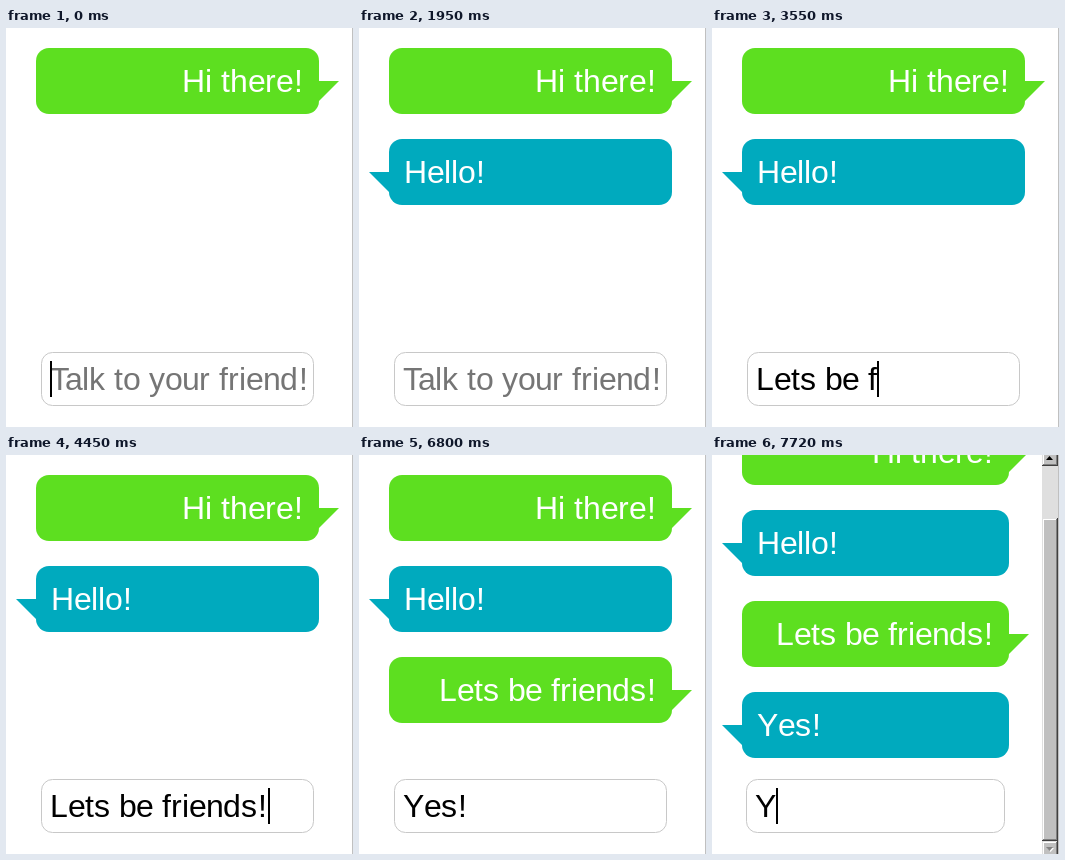
Recreate the animation shown at these times as an HTML page with a canvas. Size 347x399 px, loop 8 s.

```html
<!DOCTYPE html>
<html>
<head>
<meta charset="utf-8">
<style>
  html, body { margin: 0; width: 100%; height: 100%; overflow: hidden; background: #fff; }
  canvas { display: block; }
</style>
</head>
<body>
<canvas id="stage" width="347" height="399"></canvas>
<script>
const ctx = document.getElementById('stage').getContext('2d');
const LOOP = 8000, SCROLL_AT = 7000;
const GREEN = '#5ddf20', BLUE = '#00aabe';
const FONT = '32px "Liberation Sans", Arial, sans-serif';
const HINT = 'Talk to your friend!';

const messages = [
  { at: 0, text: 'Hi there!', mine: false },
  { at: 1650, text: 'Hello!', mine: true },
  { at: 4970, text: 'Lets be friends!', mine: false },
  { at: 7000, text: 'Yes!', mine: true }
];

// [time, typed text, caret hidden]
const typing = [
  [0, ''], [250, 'H'], [430, 'He'], [920, 'Hello'], [1370, 'Hello!'],
  [1650, ''], [1950, '', true],
  [2230, 'L'], [2400, 'Le'], [2560, 'Let'], [2720, 'Lets'], [2900, 'Lets '],
  [3060, 'Lets be'], [3230, 'Lets be '], [3400, 'Lets be f'], [3570, 'Lets be fr'],
  [3740, 'Lets be frie'], [3920, 'Lets be frien'], [4090, 'Lets be friend'],
  [4270, 'Lets be friends'], [4450, 'Lets be friends!'],
  [4970, ''], [5470, 'Y'], [5660, 'Ye'], [5860, 'Yes'], [6050, 'Yes!'],
  [6600, 'Yes!', true], [7000, ''], [7720, 'Y']
];

// Whole-pixel advances, as in grid-fitted type
function advance(c) {
  if (c === '!') return 11;
  if (c === 'T') return 15; // kerned against "a"
  const w = ctx.measureText(c).width;
  return 'aeounb'.includes(c) ? Math.floor(w) : Math.round(w);
}

const textWidth = s => [...s].reduce((sum, c) => sum + advance(c), 0);

function drawText(s, x, y, color) {
  ctx.fillStyle = color;
  for (const c of s) {
    ctx.fillText(c, c === '!' ? x + 1 : x, y);
    x += advance(c);
  }
}

function rect(x, y, w, h, color) {
  ctx.fillStyle = color;
  ctx.fillRect(x, y, w, h);
}

function polygon(color, ...points) {
  ctx.fillStyle = color;
  ctx.beginPath();
  for (const [x, y] of points) ctx.lineTo(x, y);
  ctx.fill();
}

function bubble({ text, mine }, y, right) {
  const color = mine ? BLUE : GREEN, edge = mine ? 30 : right;
  ctx.fillStyle = color;
  ctx.beginPath();
  ctx.roundRect(30, y, right - 30, 66, 13);
  ctx.fill();
  polygon(color, [edge, y + 33], [edge + (mine ? -20 : 20), y + 33], [edge, y + 53]);
  drawText(text, mine ? 45 : right - 15 - textWidth(text), y + 44, '#fff');
}

function inputBox(left, right, text, caretHidden) {
  ctx.fillStyle = '#fff';
  ctx.strokeStyle = '#c8c8c8';
  ctx.beginPath();
  ctx.roundRect(left + 0.5, 324.5, right - left - 1, 53, 11);
  ctx.fill();
  ctx.stroke();

  const x = left + 9;
  ctx.save();
  ctx.beginPath();
  ctx.rect(x, 333, right - left - 18, 36);
  ctx.clip();
  drawText(text || HINT, x, 362, text ? '#000' : '#757575');
  if (!caretHidden) rect(x + textWidth(text), 333, 2, 36, '#000');
  ctx.restore();
}

function raised(y, h) {
  rect(330, y, 16, h, '#404040');
  rect(330, y, 15, h - 1, '#dfdfdf');
  rect(331, y + 1, 14, h - 2, '#808080');
  rect(331, y + 1, 13, h - 3, '#fff');
  rect(332, y + 2, 12, h - 4, '#c0c0c0');
}

function scrollbar() {
  rect(330, 0, 16, 399, '#dfdfdf');
  raised(-5, 16);
  raised(63, 323);
  raised(386, 16);
  polygon('#000', [334, 5], [337.5, 1], [341, 5]);
  polygon('#fff', [335, 393], [342, 393], [338.5, 397]);
  polygon('#808080', [334, 392], [341, 392], [337.5, 396]);
}

function draw(t) {
  const scrolled = t >= SCROLL_AT;
  const [, text, caretHidden] = typing.findLast(step => step[0] <= t);
  rect(0, 0, 347, 399, '#fff');
  ctx.font = FONT;
  messages.forEach((m, i) => {
    if (t >= m.at) bubble(m, 20 + i * 91 - (scrolled ? 56 : 0), scrolled ? 297 : 313);
  });
  inputBox(scrolled ? 34 : 35, scrolled ? 293 : 308, text, caretHidden);
  if (scrolled) scrollbar();
  rect(346, 0, 1, 399, '#c0c0c0');
}

function tick() {
  draw(performance.now() % LOOP);
  requestAnimationFrame(tick);
}
tick();
</script>
</body>
</html>
```
